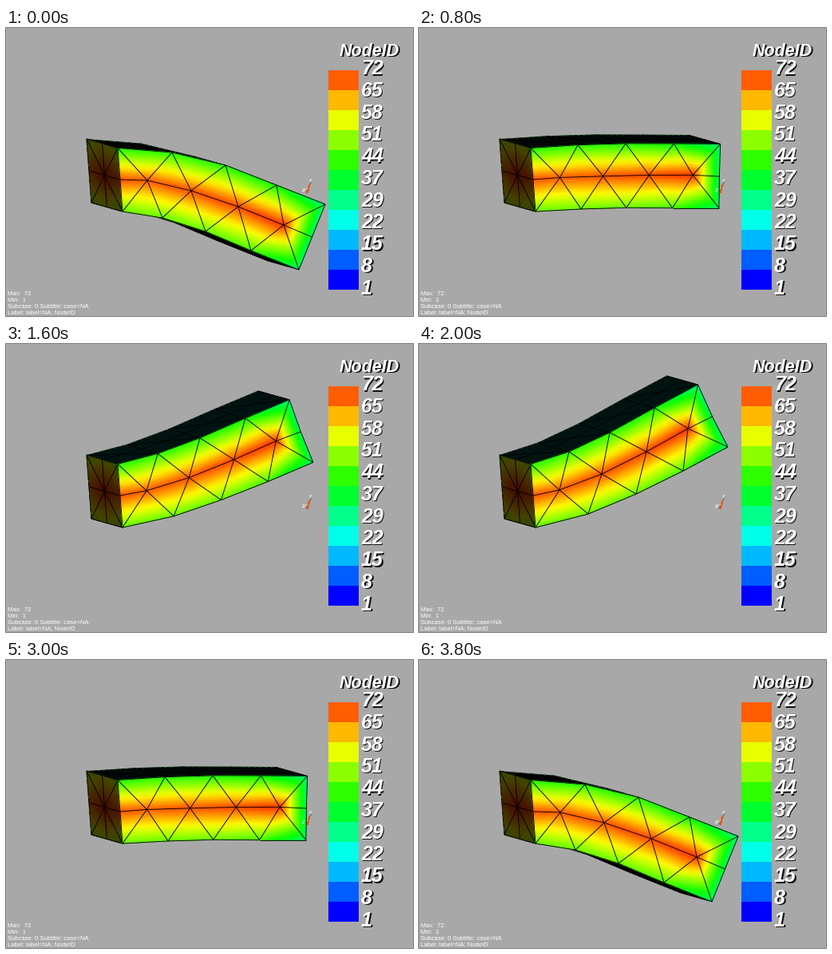
These frames come from a looping animation (510 by 361 pixels, 3900 ms). A matplotlib script:

```python
import colorsys

import matplotlib.pyplot as plt
import numpy as np
from matplotlib.animation import FuncAnimation
from matplotlib.collections import LineCollection
from matplotlib.colors import ListedColormap
from matplotlib.patches import Polygon, Rectangle
from matplotlib.tri import LinearTriInterpolator, Triangulation, UniformTriRefiner

W, H, DPI = 510, 361, 64
PX = 72 / DPI  # points per pixel
FRAMES, STEP = 39, 100
BACK = np.array([-39, -11])  # screen offset from the front side to the back

# Front side nodes with the beam fully down and near fully up:
# top edge, bottom edge, then the centre line.
LOW = np.array([
    (140, 150.5), (208, 156), (275, 172), (339, 197), (400, 221),
    (146, 230), (196, 238), (250, 255), (307, 279), (367, 303),
    (143, 190), (177, 191), (232, 204), (291, 224), (348, 247), (383.5, 262)])
HIGH = np.array([
    (140, 150.5), (188, 135), (239, 111), (295, 80), (349.5, 51),
    (146, 230), (212, 213), (272, 188), (331, 159), (387, 129),
    (143, 190), (176, 183), (229, 163), (285, 135), (337, 106), (367.5, 91)])
VALUES = np.array([.53, .54, .53, .51, .37,
                   .60, .60, .60, .57, .39,
                   .92, .91, .92, .93, .95, .41])

FRONT = []
for row in (0, 5):
    FRONT += [(row + i, row + i + 1, 11 + i) for i in range(4)]
    FRONT += [(row + i, 10 + i, 11 + i) for i in range(5)]

# Fixed end: three nodes along the top, middle and bottom.
END = np.array([(x + dx * u, y + dy * u)
                for x, y, dx, dy in ((101, 139, 39, 11.5), (104, 179, 39, 11),
                                     (107, 219, 39, 11))
                for u in (0, .5, 1)])
END_VALUES = np.array([.68, .74, .68, .88, .97, .90, .68, .72, .66])
END_TRIS = [(4, a, b) for a, b in
            ((0, 1), (1, 2), (2, 5), (5, 8), (8, 7), (7, 6), (6, 3), (3, 0))]


def hue(t):
    return colorsys.hsv_to_rgb(2 / 3 * (1 - t), 1, 1)


def shaded(light):
    return ListedColormap([[c * light for c in hue(t)]
                           for t in np.linspace(0, 1, 256)])


LIT, DIM = shaded(1), shaded(.27)

fig = plt.figure(figsize=(W / DPI, H / DPI), dpi=DPI, facecolor="#a8a8a8")
ax = fig.add_axes([0, 0, 1, 1])
ax.set_xlim(0, W)
ax.set_ylim(H, 0)
ax.axis("off")


def write(x, y, text, size, **style):
    ax.text(x, y, text, fontsize=size * PX, color=style.pop("color", "white"),
            family="Liberation Sans", va="baseline", **style)


def heading(x, y, text, size):
    for d, color in ((1.2, "#101010"), (0, "white")):
        write(x + d, y + d, text, size, color=color,
              weight="bold", style="italic")


def stroke(points, color, width, zorder, **style):
    return ax.plot(*np.transpose(points), color=color, lw=width * PX,
                   zorder=zorder, **style)[0]


def draw_legend():
    heading(418, 35, "NodeID", 21.5)
    for i in range(11):
        ax.add_patch(Rectangle((404, 328 - 25 * (i + 1)), 37.5, 25,
                               fc=hue(i / 11), lw=0, antialiased=False))
    labels = (72, 65, 58, 51, 44, 37, 29, 22, 15, 8, 1)
    for i, label in enumerate(labels):
        heading(445, 58.5 + 27.5 * i, str(label), 25)


def draw_notes():
    lines = ("Max:  72", "Min:  1", "Subcase: 0 Subtitle: case=NA",
             "Label: label=NA; NodeID")
    for i, line in enumerate(lines):
        write(2, 335 + 7.8 * i, line, 7.6)


def draw_axes_marker():
    stroke([(376, 206), (383, 192)], "#606060", 1, 1)
    stroke([(378, 206), (380, 197)], "#f05010", 2, 1)
    stroke([(373, 204), (378, 201)], "#e8d8a0", 1, 1)
    write(379, 193, "x", 7, style="italic", zorder=9)
    write(370, 205, "z", 7, style="italic", zorder=9)


def draw_mesh(points, tris, values, cmap, zorder):
    tri = Triangulation(*points.T, triangles=tris)
    fine, field = UniformTriRefiner(tri).refine_field(
        values, triinterpolator=LinearTriInterpolator(tri, values), subdiv=3)
    fill = ax.tripcolor(fine, field, shading="gouraud", cmap=cmap,
                        vmin=0, vmax=1, zorder=zorder)
    wires = LineCollection(points[tri.edges], colors="black",
                           linewidths=.9 * PX, zorder=zorder + .5)
    ax.add_collection(wires, autolim=False)
    return [fill, wires]


def draw_strip(edge, color, zorder):
    outline = np.vstack([edge, (edge + BACK)[::-1]])
    return ax.add_patch(Polygon(outline, fc=color, ec="black", lw=.8 * PX,
                                zorder=zorder))


moving = []


def update(frame):
    while moving:
        moving.pop().remove()
    rise = min(frame, FRAMES - 1 - frame) / 18
    nodes = LOW + (HIGH - LOW) * rise
    top, bottom = nodes[:5], nodes[5:10]
    far = top + BACK

    moving.append(draw_strip(bottom, "black", 2))
    glow = min(1, max(0, rise - .15) * 1.6)
    moving.append(draw_strip(top, (0, .075 * glow, .065 * glow), 3))
    middle = top + BACK / 2
    zigzag = np.array([p for pair in zip(top, far) for p in pair])
    moving.append(stroke(middle, "black", .8, 3.2))
    moving.append(stroke(zigzag, "black", .8, 3.2))
    moving.append(stroke(far, "#087010", 1, 3.4, linestyle=(0, (2, 5))))

    moving.extend(draw_mesh(END, END_TRIS, END_VALUES, DIM, 4))
    moving.append(stroke(END[[0, 3, 6]], "#1c6008", 1, 4.8,
                         linestyle=(0, (2, 6))))
    moving.extend(draw_mesh(nodes, FRONT, VALUES, LIT, 5))
    return moving


draw_legend()
draw_notes()
draw_axes_marker()
anim = FuncAnimation(fig, update, frames=FRAMES, interval=STEP,
                     init_func=lambda: update(0), repeat=True, repeat_delay=0)
plt.show()
```
